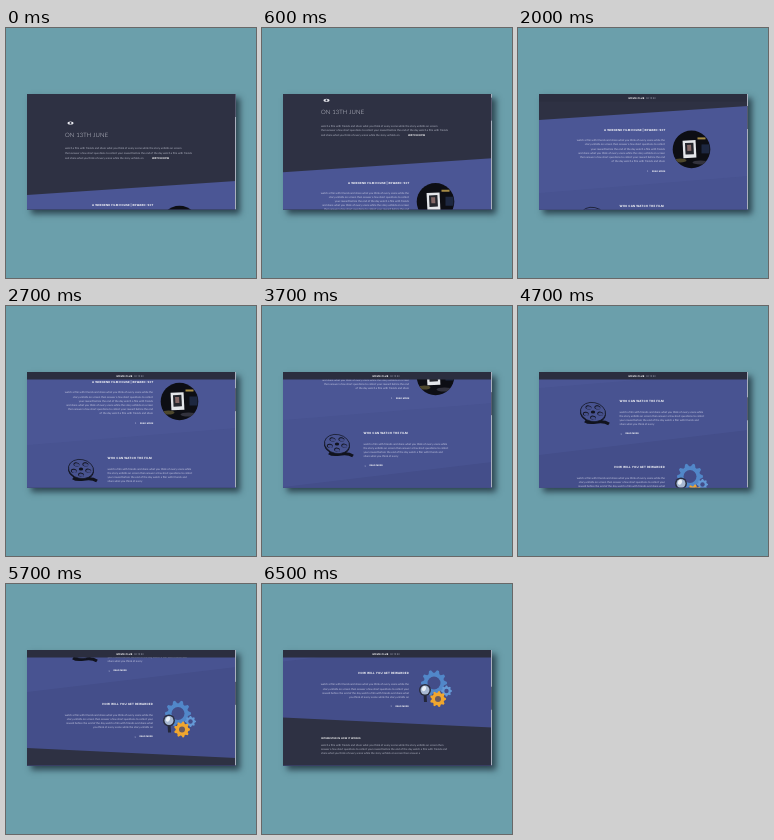
These frames come from a looping animation (250 px wide and 250 px high, 6700 ms). An HTML page with a canvas:

```html
<!DOCTYPE html>
<html lang="en">
<head>
<meta charset="utf-8">
<title>Film page scroll</title>
<style>
html, body { margin: 0; width: 100%; height: 100%; overflow: hidden; background: #6b9fab; }
canvas { display: block; width: 250px; height: 250px; }
</style>
</head>
<body>
<canvas id="stage"></canvas>
<script>
const canvas = document.getElementById('stage');
const ctx = canvas.getContext('2d');
const dpr = window.devicePixelRatio || 1;
canvas.width = canvas.height = Math.round(250 * dpr);
ctx.textRendering = 'geometricPrecision';

const LOOP = 6700, STEP = 100, LAST = 6500;
const win = { x: 21, y: 66, w: 209, h: 115.5 };
const right = win.x + win.w;
const HEAD = 'Inter, sans-serif';
const BODY = 'Lato, sans-serif';
// time in ms, scroll offset in px
const path = [[0, 0], [1200, 45.5], [2700, 101], [3700, 126], [4700, 158], [5700, 199], [6500, 229.5]];

const words = ('watch a film with friends and share what you think of every scene while the story ' +
  'unfolds on screen then answer a few short questions to collect your reward before the end of the day').split(' ');

function scrollAt(t) {
  for (let i = 1; i < path.length; i++) {
    const [t0, y0] = path[i - 1], [t1, y1] = path[i];
    if (t <= t1) return y0 + (y1 - y0) * (t - t0) / (t1 - t0);
  }
  return path[path.length - 1][1];
}

function label(str, x, y, size, o = {}) {
  ctx.font = `${o.weight || 700} ${size}px ${o.font || HEAD}`;
  ctx.letterSpacing = (o.gap || 0) + 'px';
  ctx.textAlign = o.align || 'left';
  ctx.textBaseline = 'middle';
  ctx.fillStyle = o.color || '#ffffff';
  ctx.fillText(str, x, y);
  ctx.letterSpacing = '0px';
}

// Fills each line with words up to its width.
function paragraph(x, y, lead, widths, align, color) {
  const size = 2.7;
  ctx.font = `400 ${size}px ${BODY}`;
  let n = 0;
  widths.forEach((w, i) => {
    let line = words[n++ % words.length];
    while (true) {
      const next = line + ' ' + words[n % words.length];
      if (ctx.measureText(next).width > w + 1.5) break;
      line = next;
      n++;
    }
    label(line, x, y + i * lead, size, { weight: 400, font: BODY, align, color });
  });
}

function fill(color, build) {
  ctx.beginPath();
  build();
  ctx.fillStyle = color;
  ctx.fill();
}

const disc = (x, y, r, color) => fill(color, () => ctx.arc(x, y, r, 0, Math.PI * 2));
const oval = (x, y, rx, ry, color, turn = 0) =>
  fill(color, () => ctx.ellipse(x, y, rx, ry, turn, 0, Math.PI * 2));

function box(x, y, w, h, color) {
  ctx.fillStyle = color;
  ctx.fillRect(x, y, w, h);
}

// Everything below a slanted edge.
function slab(yl, yr, color) {
  fill(color, () => {
    ctx.moveTo(win.x, yl);
    ctx.lineTo(right, yr);
    ctx.lineTo(right, 620);
    ctx.lineTo(win.x, 620);
  });
}

function readMore(x, y) {
  label('›', x - 5, y, 3, { color: '#c9cdea' });
  label('READ MORE', x, y, 2.15, { gap: 0.08 });
}

function gear(x, y, r, teeth, color, hole, holeColor) {
  fill(color, () => {
    for (let i = 0; i < teeth * 4; i++) {
      const a = (i - 0.5) / (teeth * 4) * Math.PI * 2;
      const d = i % 4 < 2 ? r : r * 0.79;
      ctx.lineTo(x + Math.cos(a) * d, y + Math.sin(a) * d);
    }
  });
  disc(x, y, hole, holeColor);
}

function photo(x, y) {
  ctx.save();
  ctx.beginPath();
  ctx.arc(x, y, 18.8, 0, Math.PI * 2);
  ctx.clip();
  box(x - 20, y - 20, 40, 40, '#0d0e14');
  box(x + 6, y - 12, 8, 2, '#a58b45');
  box(x + 10, y - 5, 8, 9, '#1d2740');
  oval(x - 11, y + 11, 6, 2, '#4d472c');
  oval(x + 9, y + 13, 8, 2, '#32323d');
  ctx.translate(x - 2, y);
  ctx.rotate(-0.05);
  box(-6.5, -9, 13, 17.5, '#e4e6ea');
  box(-4.2, -6.5, 8.4, 11.5, '#25262d');
  box(-2.2, -4.5, 4, 6, '#846766');
  ctx.restore();
}

function reel(x, y) {
  const ink = '#11131e', tilt = 0.2;
  ctx.strokeStyle = ink;
  ctx.lineWidth = 3;
  ctx.beginPath();
  ctx.moveTo(x - 8, y + 9);
  ctx.bezierCurveTo(x - 1, y + 14, x + 7, y + 6, x + 16, y + 12);
  ctx.stroke();
  oval(x, y + 1, 13, 10, ink, tilt);
  oval(x, y, 12.6, 9.5, '#485390', tilt);
  ctx.lineWidth = 0.7;
  for (let i = 0; i < 5; i++) {
    const a = i / 5 * Math.PI * 2 + 0.3;
    const px = x + Math.cos(a) * 7.6, py = y + Math.sin(a) * 5.7;
    oval(px, py, 3, 2.1, ink, tilt);
    oval(px + 0.3, py + 0.5, 2.5, 1.6, '#444e89', tilt);
  }
  oval(x, y, 2.2, 1.6, ink);
  ctx.beginPath();
  ctx.ellipse(x, y, 12.6, 9.5, tilt, 0, Math.PI * 2);
  ctx.stroke();
}

function gears(x, y) {
  gear(x, y, 13, 10, '#5187c9', 6.5, '#434d89');
  gear(x + 12.5, y + 8, 5.5, 8, '#6499d6', 2.2, '#434d89');
  gear(x + 4, y + 16, 8, 9, '#f0a62e', 3, '#6b5a5c');
  ctx.beginPath();
  ctx.moveTo(x - 9, y + 10);
  ctx.lineTo(x - 8.5, y + 19);
  ctx.lineWidth = 3;
  ctx.strokeStyle = '#23273a';
  ctx.stroke();
  disc(x - 9, y + 7, 6, '#292d40');
  disc(x - 9, y + 7, 4.5, '#a9bad3');
  oval(x - 10, y + 5.6, 2, 2.6, '#eaf0f7', 0.5);
}

function hero() {
  oval(64.5, 95, 3, 1.6, '#e9eaf0');
  disc(64.5, 95, 1, '#2e3142');
  label('ON 13TH JUNE', 59, 107.3, 5.9, { weight: 300, font: BODY, gap: 0.15, color: '#dfe1e9' });
  paragraph(59, 120.5, 4.8, [116, 130, 85], 'left', '#b4b7c5');
  label('WATCH NOW', 146, 130.2, 2.5, { gap: 0.1 });
}

function page() {
  box(win.x, 0, win.w, 620, '#2e3143');
  hero();

  slab(167, 153, '#4b5695');
  slab(240, 223, '#485391');
  slab(307, 282, '#444e8a');
  slab(363, 373, '#2e3143');

  const pale = '#c6c9e2';
  label('A WEEKEND FILM HOUSE | REWARD: 50T', 147.5, 177.5, 2.8, { align: 'right', gap: 0.15 });
  paragraph(147, 187.5, 4.2, [87, 79, 77, 89, 84, 56], 'right', pale);
  readMore(134, 218.5);
  photo(173.5, 196.5);

  label('WHO CAN WATCH THE FILM', 101.5, 253, 2.9, { gap: 0.2 });
  paragraph(101.5, 263.7, 4.25, [86, 87, 84, 34], 'left', pale);
  readMore(107.5, 285.7);
  reel(75, 264);

  label('HOW WILL YOU GET REWARDED', 147, 319, 2.9, { align: 'right', gap: 0.2 });
  paragraph(147, 330, 4.2, [87, 86, 87, 62], 'right', pale);
  readMore(133.5, 351.7);
  gears(172, 328.5);

  label('INTERESTED IN HOW IT WORKS', 59, 384, 2.4, { gap: 0.1 });
  paragraph(59, 390.7, 4, [126, 126, 101], 'left', '#b4b7c5');
}

function topBar() {
  box(win.x, win.y, win.w, 7.5, '#2b2e3f');
  label('MOVIE CLUB', 110.5, 70, 2.4, { gap: 0.1 });
  label('00:12:30', 128, 70, 2.4, { weight: 400, color: '#a9acbb' });
}

function draw(t) {
  const scroll = scrollAt(t);
  ctx.setTransform(dpr, 0, 0, dpr, 0, 0);
  box(0, 0, 250, 250, '#6b9fab');

  ctx.save();
  ctx.shadowColor = 'rgba(22, 38, 48, 0.72)';
  ctx.shadowBlur = 6 * dpr;
  ctx.shadowOffsetX = 4 * dpr;
  ctx.shadowOffsetY = 4 * dpr;
  box(win.x, win.y, win.w, win.h, '#2e3143');
  ctx.restore();

  ctx.save();
  ctx.beginPath();
  ctx.rect(win.x, win.y, win.w, win.h);
  ctx.clip();
  ctx.save();
  ctx.translate(0, -scroll);
  page();
  ctx.restore();
  if (scroll > 70) topBar();
  box(right - 1, win.y, 1, win.h, '#a9afbd');
  box(right - 1, win.y + scroll * 0.16, 1, 23, '#565b70');
  ctx.restore();
}

function tick(now) {
  const t = now % LOOP;
  draw(Math.min(Math.floor(t / STEP) * STEP, LAST));
  requestAnimationFrame(tick);
}

draw(0);
requestAnimationFrame(tick);
</script>
</body>
</html>
```
